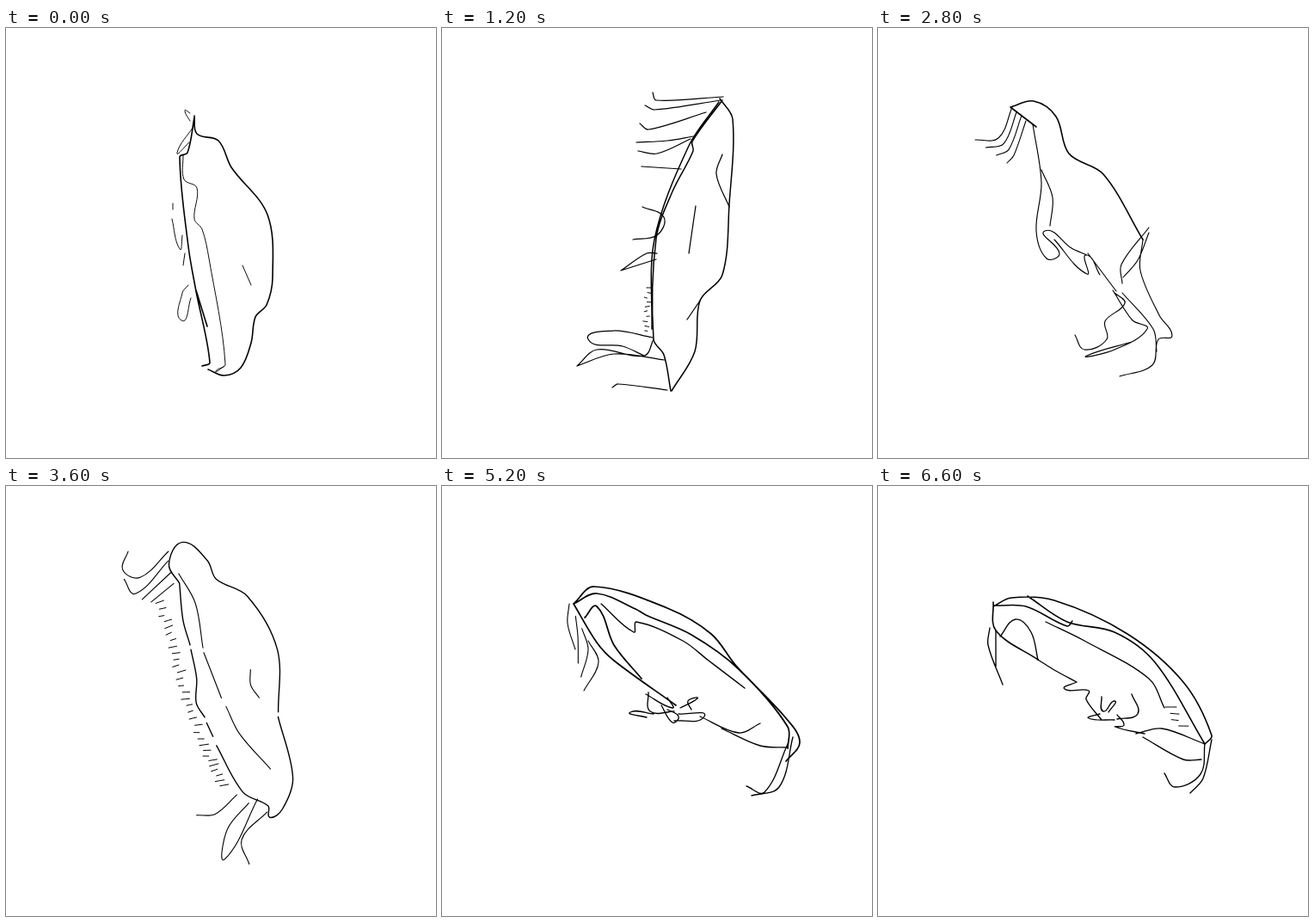
An HTML page with a canvas that plays this animation: 500x500 px, repeating every 6800 ms.

```html
<!DOCTYPE html>
<html lang="en">
<head>
<meta charset="utf-8">
<title>Ink creature</title>
<style>
html, body { margin: 0; height: 100%; overflow: hidden; background: #fff; }
canvas { display: block; width: 100vw; height: 100vh; }
</style>
</head>
<body>
<canvas id="stage" width="500" height="500"></canvas>
<script>
const LOOP = 6800, STEP = 200;
const ctx = document.getElementById('stage').getContext('2d');
let place;

const points = text => text.split(' ').map(pair => pair.split(',').map(Number));
const mix = (a, b, u) => a.map((v, k) => v + (b[k] - v) * u);

// Smooth line through all points, with handles scaled to each segment
function trace(raw) {
  const p = raw.map(place);
  const heading = i => {
    const a = p[Math.max(0, i - 1)], b = p[Math.min(p.length - 1, i + 1)];
    const d = Math.hypot(b[0] - a[0], b[1] - a[1]) || 1;
    return [(b[0] - a[0]) / d, (b[1] - a[1]) / d];
  };
  ctx.moveTo(...p[0]);
  for (let i = 1; i < p.length; i++) {
    const a = p[i - 1], b = p[i], m = heading(i - 1), n = heading(i);
    const r = Math.hypot(b[0] - a[0], b[1] - a[1]) / 3;
    ctx.bezierCurveTo(a[0] + m[0] * r, a[1] + m[1] * r, b[0] - n[0] * r, b[1] - n[1] * r, ...b);
  }
}

function ink(weight, strokes) {
  ctx.lineWidth = weight;
  ctx.beginPath();
  strokes.forEach(trace);
  ctx.stroke();
}
const pen = (weight, ...texts) => ink(weight, texts.map(points));

// Hairs blended between a first and a last one
function fan(n, first, last) {
  const a = points(first), b = points(last);
  ink(1.1, Array.from({ length: n }, (_, i) => a.map((q, k) => mix(q, b[k], i / (n - 1)))));
}

// Short dashes along a line
function ticks(from, to, n, len) {
  const [a, b] = points(from + ' ' + to);
  ink(1, Array.from({ length: n }, (_, i) => {
    const [x, y] = mix(a, b, i / (n - 1)), left = x + 2 * Math.sin(i * 2.4);
    return [[left, y], [left + len * (.8 + .2 * Math.cos(i * 1.7)), y + Math.sin(i)]];
  }));
}

function husk() {
  pen(1.6, '219,102 222,123 247,131 262,162 304,217 310,290 303,322 290,336 285,366 273,395 254,404 235,397',
    '219,104 211,145 202,150 212,254 221,306 237,389 228,393', '221,305 234,347');
  pen(.95, '214,108 208,96 214,99', '217,116 199,145 213,133',
    '206,148 207,176 222,186 219,222 228,234 236,268 255,391 244,399 254,393',
    '194,204 194,211', '193,222 202,257 205,241', '208,262 206,276',
    '212,299 205,308 204,340 215,314', '275,276 285,299');
}

function leaning() {
  pen(1.5, '323,82 338,106 334,205 326,287 300,317 294,376 267,422',
    '326,84 291,132 292,143 268,190 249,245 246,362 258,380 266,422', '322,86 287,137 247,246 244,350');
  pen(1.25, '245,75 249,84 327,80', '236,90 247,95 324,84', '230,111 240,118 307,98',
    '226,133 262,131 292,126', '228,143 250,146 289,129', '232,161 278,164',
    '233,208 258,220 250,241 222,246', '208,282 238,262 250,262', '208,282 249,269',
    '245,360 200,352 170,362 210,370 235,381', '157,393 180,374 235,381 246,362',
    '157,393 200,379 259,386', '198,418 205,414 262,421',
    '334,208 319,170 326,147', '295,207 287,262', '285,339 300,317');
  ticks('238,302', '235,352', 10, 5);
}

function curled() {
  pen(1.6, '296,74 322,73 326,95 333,120 322,197 296,274 281,338 263,414', '210,307 212,338 262,412');
  pen(1.25, '296,74 291,91 302,100 268,130 249,163 246,185 210,206 220,230 207,292 210,310',
    '299,76 304,103 269,126 253,150 251,192 214,205', '214,218 234,213 222,275 208,305',
    '302,152 313,200 296,274', '296,274 265,298 251,327',
    '201,236 213,240 213,260', '225,170 240,185', '189,289 208,298',
    '214,335 210,370 190,374 168,320 173,312 182,358 200,378',
    '214,335 228,347 236,334 229,354 247,375 257,365 263,408',
    '203,422 207,410 252,414 256,405', '203,422 214,414 248,426 258,406');
}

function stooped() {
  pen(1.6, '154,92 181,85 207,103 222,146 262,170 308,246', '154,92 184,115');
  pen(1.15, '308,246 305,282 327,334 342,358 326,362 319,392 281,405',
    '180,112 190,180 184,236 196,268 211,262 194,236 225,256 243,264',
    '190,165 203,197 200,230', '205,246 243,286 242,264 258,287', '244,262 277,306',
    '315,232 283,275 284,297', '315,238 302,270 285,290',
    '229,357 240,374 266,362 264,341 287,320 275,308',
    '273,305 296,340 313,350 275,374 243,381 295,365', '284,308 320,350 324,376');
  fan(4, '113,130 140,128 156,92', '150,157 158,148 172,108');
}

function fringed() {
  pen(1.4, '238,122 232,100 250,80 273,103 278,124 304,152 319,215 305,280',
    '303,285 303,350 285,381 269,387 271,375 249,353 231,295',
    '238,122 229,160 230,187', '230,192 231,223 224,248 228,264', '228,270 230,285');
  pen(1.1, '240,112 248,145 243,192', '243,197 252,248', '254,258 258,290 281,337',
    '288,229 285,245 290,261', '193,72 184,90 200,103 234,86', '183,100 190,118 232,96',
    '195,126 232,109', '203,132 232,121', '195,364 215,366 242,353',
    '252,366 222,385 210,414 262,365', '233,428 233,400 268,381');
  ticks('207,135', '213,285', 22, 9);
  ticks('213,292', '226,338', 9, 10);
}

function diving() {
  pen(1.75, '153,137 177,117 262,142 313,172 342,209 400,270 416,298 400,320',
    '153,137 180,125 225,143 237,150 290,173 345,213 402,280 402,305',
    '166,153 180,140 200,185 232,224', '153,137 180,182 200,203 272,255');
  pen(1.35, '185,137 223,170 226,158 280,180 310,203 352,235',
    '300,268 345,287 370,276', '325,282 370,302 402,304',
    '408,292 392,350 360,360', '402,300 375,356 354,349',
    '237,242 268,258 262,246', '246,265 219,263 238,269', '240,240 242,262 270,262',
    '255,255 268,275 275,268 262,260', '277,258 297,247 286,250 290,260', '275,265 305,268 270,273');
  fan(4, '148,137 146,160 155,190', '170,180 182,205 165,238');
}

function arched() {
  pen(1.6, '134,140 155,130 205,133 290,172 355,228 388,290 380,300',
    '174,128 220,158 275,170 322,205 380,300', '137,139 172,140 220,163 226,157',
    '134,135 137,168 186,202');
  pen(1.35, '195,158 240,180 315,224 333,258', '142,175 160,155 178,170 186,202',
    '186,202 205,214 231,228', '130,165 128,185 145,231', '137,168 137,210',
    '231,228 217,236 245,238 242,248 260,272', '275,272 245,270 258,265',
    '260,245 262,262 275,250 268,263', '295,242 302,265 278,271', '278,266 286,278 276,280 310,288',
    '300,288 330,282 380,300', '308,292 355,318 376,318',
    '388,295 378,340 363,357', '380,300 375,335 345,350 333,334');
  ticks('334,257', '348,279', 4, 13);
}

// Time, drawing, head and tail
const poses = [
  [0, husk, [218, 100, 240, 402]], [1200, leaning, [323, 82, 267, 422]],
  [2000, curled, [312, 73, 262, 412]], [2800, stooped, [165, 88, 338, 358]],
  [4400, fringed, [245, 82, 270, 387]], [5200, diving, [165, 120, 410, 305]],
  [6600, arched, [138, 135, 382, 310]]
];

// Rotate, scale and shift so that one head-tail axis lands on another
function mapping([ax, ay, bx, by], [cx, cy, dx, dy]) {
  const ux = bx - ax, uy = by - ay, vx = dx - cx, vy = dy - cy, q = ux * ux + uy * uy;
  const c = (ux * vx + uy * vy) / q, s = (ux * vy - uy * vx) / q;
  return ([x, y]) => [cx + c * (x - ax) - s * (y - ay), cy + s * (x - ax) + c * (y - ay)];
}

function frame() {
  const t = Math.floor(performance.now() % LOOP / STEP) * STEP;
  const i = Math.max(1, poses.findIndex(pose => pose[0] >= t));
  const a = poses[i - 1], b = poses[i], u = (t - a[0]) / (b[0] - a[0]);
  const [, drawing, axis] = u < .5 ? a : b;
  // The body stretches midway between two poses
  const bulge = Math.sin(Math.PI * u), [hx, hy, tx, ty] = mix(a[2], b[2], u), k = .05 * bulge;
  const move = mapping(axis, [hx - (tx - hx) * k, hy - (ty - hy) * k, tx + (tx - hx) * k, ty + (ty - hy) * k]);
  const wobble = u > 0 && u < 1 ? 2 : 0;
  place = point => {
    const [x, y] = move(point);
    return [x + wobble * Math.sin(y / 21 + t), y + wobble * Math.sin(x / 17 + t * 2)];
  };
  ctx.fillStyle = '#fff';
  ctx.fillRect(0, 0, 500, 500);
  ctx.lineCap = ctx.lineJoin = 'round';
  drawing();
  requestAnimationFrame(frame);
}
frame();
</script>
</body>
</html>
```
